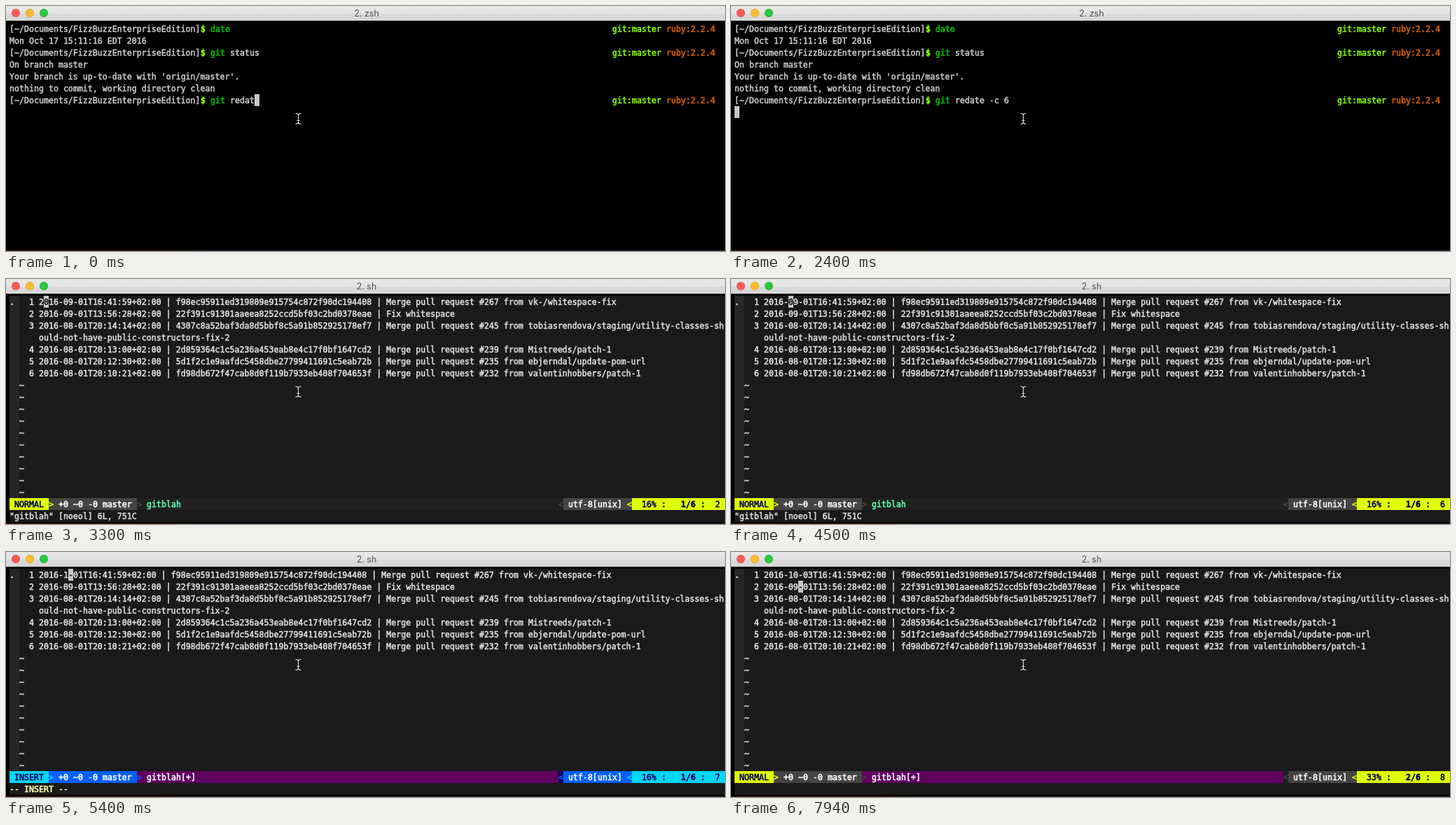
These frames come from a looping animation (1027x350 px, 8000 ms). An HTML page:

```html
<!DOCTYPE html>
<html lang="en">
<head>
<meta charset="utf-8">
<title>Terminal session</title>
<style>
  html, body { margin: 0; width: 100%; height: 100%; overflow: hidden; background: #000; }
  #stage { position: relative; width: 1027px; height: 350px; overflow: hidden; background: #000; }
  #bar { position: absolute; inset: 0 0 auto; height: 21px; background: linear-gradient(#e8e8e8, #e4e4e4 50%, #dadada 52%, #d6d6d6); }
  #bar i { position: absolute; top: 4px; width: 12px; height: 12px; border-radius: 50%; box-shadow: inset 0 0 0 .5px #0003; }
  #title { position: absolute; left: 415px; width: 200px; text-align: center; font: 12.5px/21px Inter, Roboto, sans-serif; color: #555; }
  #screen { font: 11.627px/18px "DejaVu Sans Mono", "Liberation Mono", monospace; -webkit-text-stroke: .55px; font-variant-ligatures: none; }
  #screen span { position: absolute; height: 17px; white-space: pre; }
  #screen div { position: absolute; }
  #pointer { position: absolute; left: 411px; top: 151px; }
  #edge { position: absolute; inset: auto 0 0; height: 1px; background: linear-gradient(90deg, #4a2212 210px, #2a3440 300px); }
</style>
</head>
<body>
<div id="stage">
  <div id="bar">
    <i style="left:8px;background:#fc5b57"></i>
    <i style="left:28px;background:#fdbc2e"></i>
    <i style="left:48px;background:#2ac73f"></i>
    <div id="title"></div>
  </div>
  <div id="screen"></div>
  <svg id="pointer" width="13" height="20" fill="none" stroke="#ddd" stroke-width="1.1">
    <path d="M2.5 2.5Q6 2.5 6.5 4.5Q7 2.5 10.5 2.5M6.5 4.5V15.5M2.5 17.5Q6 17.5 6.5 15.5Q7 17.5 10.5 17.5M4.5 12.5H8.5"/>
  </svg>
  <div id="edge"></div>
</div>
<script>
const LOOP = 8000, CELL_W = 7, CELL_H = 17, LEFT = 5, TOP = 24;
const GREY = '#c7c7c7', TEXT = '#dcdcdc';
const screenEl = document.getElementById('screen');
const titleEl = document.getElementById('title');

// Each step changes only the listed fields.
const steps = [
  [0, { cmd: 'redat', ran: false, vim: false, bar: false, title: 'zsh', mode: 'NORMAL', dirty: false,
        msg: '"gitblah" [noeol] 6L, 751C', date: '2016-09-01', line: 0, pos: 0 }],
  [150, { cmd: 'redate' }],
  [300, { cmd: 'redate ' }],
  [450, { cmd: 'redate -' }],
  [600, { cmd: 'redate -c' }],
  [900, { cmd: 'redate -c ' }],
  [1800, { cmd: 'redate -c 6' }],
  [2400, { ran: true }],
  [2550, { vim: true }],
  [2700, { bar: true }],
  [3150, { title: 'sh' }],
  [3300, { pos: 1 }],
  [3600, { pos: 2 }],
  [3750, { pos: 3 }],
  [3900, { pos: 5 }],
  [4050, { pos: 6 }],
  [4500, { pos: 5 }],
  [4800, { date: '2016-9-01', dirty: true }],
  [5100, { date: '2016--01' }],
  [5250, { mode: 'INSERT', msg: '-- INSERT --' }],
  [5400, { date: '2016-1-01', pos: 6 }],
  [5550, { date: '2016-10-01', pos: 7 }],
  [5850, { mode: 'NORMAL', msg: '', pos: 6 }],
  [6000, { pos: 7 }],
  [6150, { pos: 8 }],
  [6290, { pos: 9 }],
  [7040, { date: '2016-10-03' }],
  [7340, { line: 1 }],
  [7790, { pos: 8 }],
  [7940, { pos: 7 }],
];

const merge = 'Merge pull request #';
const commits = [
  ['T16:41:59', 'f98ec95911ed319809e915754c872f90dc194408', merge + '267 from vk-/whitespace-fix'],
  ['2016-09-01T13:56:28', '22f391c91301aaeea8252ccd5bf03c2bd0378eae', 'Fix whitespace'],
  ['2016-08-01T20:14:14', '4307c8a52baf3da8d5bbf8c5a91b852925178ef7',
    merge + '245 from tobiasrendova/staging/utility-classes-should-not-have-public-constructors-fix-2'],
  ['2016-08-01T20:13:00', '2d859364c1c5a236a453eab8e4c17f0bf1647cd2', merge + '239 from Mistreeds/patch-1'],
  ['2016-08-01T20:12:30', '5d1f2c1e9aafdc5458dbe27799411691c5eab72b', merge + '235 from ebjerndal/update-pom-url'],
  ['2016-08-01T20:10:21', 'fd98db672f47cab8d0f119b7933eb408f704653f', merge + '232 from valentinhobbers/patch-1'],
];

let html = '';

function put(row, col, text, color = GREY, bg = 'transparent', weight = 400) {
  const safe = text.replace(/&/g, '&amp;').replace(/</g, '&lt;');
  html += `<span style="left:${LEFT + col * CELL_W}px;top:${TOP + row * CELL_H}px;` +
    `width:${text.length * CELL_W}px;color:${color};background:${bg};font-weight:${weight}">${safe}</span>`;
}

function block(row, col, cols, rows, bg) {
  html += `<div style="left:${LEFT + col * CELL_W}px;top:${TOP + row * CELL_H}px;` +
    `width:${cols * CELL_W}px;height:${rows * CELL_H}px;background:${bg}"></div>`;
}

function prompt(row, command, args) {
  put(row, 0, '[~/Documents/FizzBuzzEnterpriseEdition]');
  put(row, 39, '$', '#87ff00', undefined, 700);
  put(row, 41, command, '#00c200');
  put(row, 42 + command.length, args);
  put(row, 123, 'git:master', '#87ff00');
  put(row, 134, 'ruby:2.2.4', '#d75f00');
}

function drawShell({ cmd, ran }) {
  prompt(0, 'date', '');
  put(1, 0, 'Mon Oct 17 15:11:16 EDT 2016');
  prompt(2, 'git', 'status');
  put(3, 0, 'On branch master');
  put(4, 0, "Your branch is up-to-date with 'origin/master'.");
  put(5, 0, 'nothing to commit, working directory clean');
  prompt(6, 'git', cmd);
  if (ran) block(7, 0, 1, 1, GREY);
  else block(6, 45 + cmd.length, 1, 1, GREY);
}

function drawStatus({ mode, dirty, line, pos }) {
  const insert = mode === 'INSERT', row = 17;
  const main = insert ? '#00d7ff' : '#dfff00';
  const side = insert ? '#005fff' : '#444444';
  const middle = dirty ? '#5f005f' : '#202020';
  put(row, 0, ` ${mode} `, '#00005f', main);
  put(row, 8, '>', main, side);
  put(row, 9, ' +0 ~0 -0 master ', '#fff', side);
  block(row, 26, 86, 1, middle);
  put(row, 26, '>', side);
  put(row, 28, 'gitblah' + (dirty ? '[+]' : ''), dirty ? '#fff' : '#5fffaf');
  put(row, 112, '<', side, insert ? '#00005f' : '#202020');
  put(row, 113, ' utf-8[unix] ', '#fff', side);
  put(row, 126, '<', main, side);
  block(row, 127, 19, 1, main);
  put(row, 129, (line ? '33' : '16') + '% :', '#00005f');
  put(row, 137, `${line + 1}/6`, '#00005f', undefined, 700);
  put(row, 141, ':' + String(pos + 1).padStart(3), '#00005f');
}

function drawEditor(state) {
  const { date, line, pos, bar, msg, mode } = state;
  block(0, 0, 146, 19, '#1a1a1a');
  block(0, 0, 2, 17, '#262626');
  put(0, 0, '.', TEXT);
  let row = 0;
  commits.forEach(([stamp, hash, subject], i) => {
    const text = `${i ? '' : date}${stamp}+02:00 | ${hash} | ${subject}`;
    put(row, 4, String(i + 1), TEXT);
    for (let at = 0; at < text.length; at += 140) put(row++, 6, text.slice(at, at + 140), TEXT);
    if (bar && i === line) put(i, 6 + pos, text[pos], '#1a1a1a', GREY);
  });
  for (; row < 17; row++) put(row, 2, '~', TEXT);
  if (bar) drawStatus(state);
  put(18, 0, msg, mode === 'INSERT' ? '#ffffaf' : TEXT);
}

let shown = -1;
const start = performance.now();

function tick() {
  const time = (performance.now() - start) % LOOP;
  const current = steps.filter(([at]) => at <= time).length;
  if (current !== shown) {
    shown = current;
    const state = Object.assign({}, ...steps.slice(0, current).map(([, change]) => change));
    html = '';
    (state.vim ? drawEditor : drawShell)(state);
    screenEl.innerHTML = html;
    titleEl.textContent = '2. ' + state.title;
  }
  requestAnimationFrame(tick);
}
tick();
</script>
</body>
</html>
```
